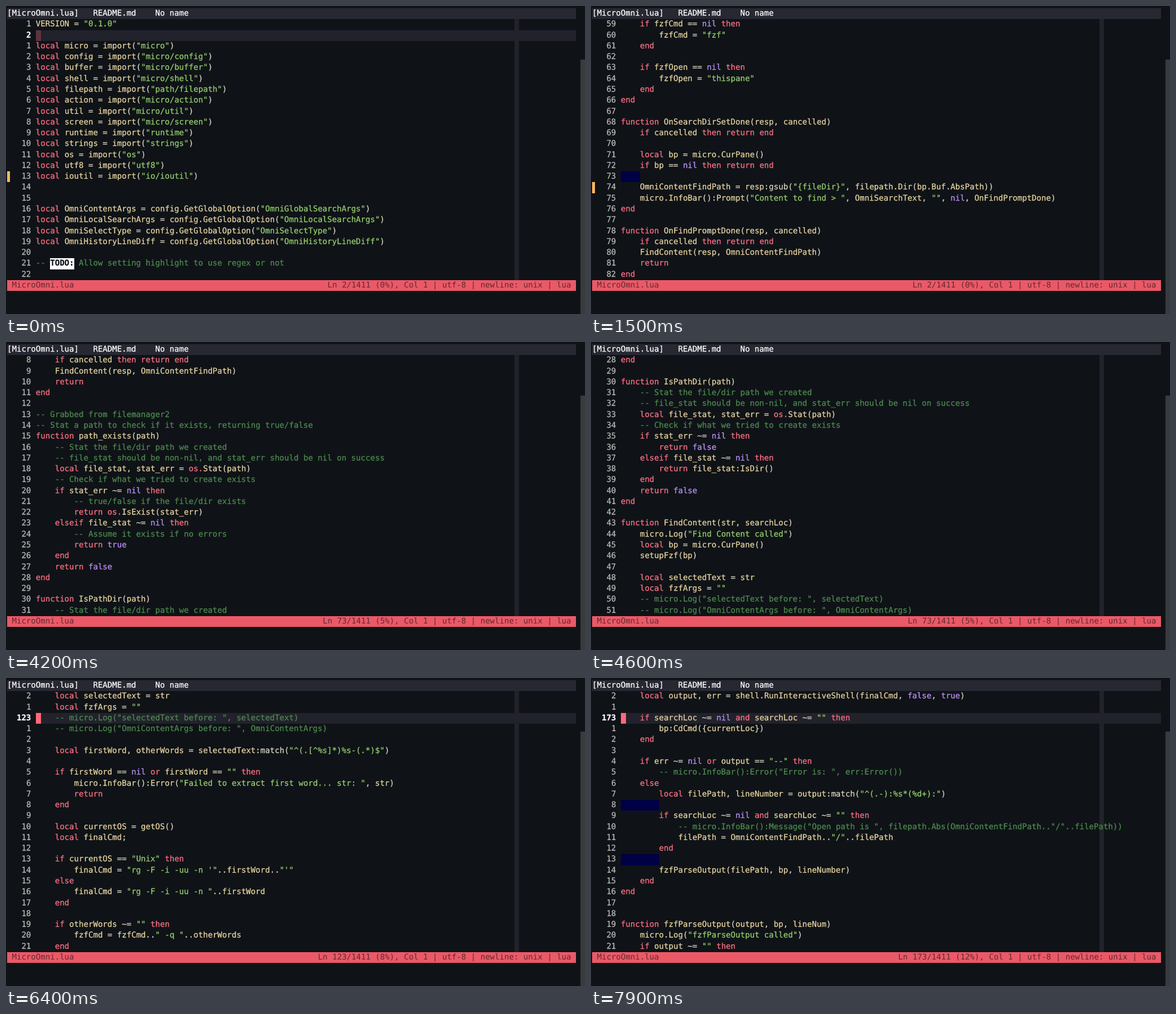
Animation, 1026 px wide and 546 px high, one loop 8 s. Source, as an HTML page:

```html
<!DOCTYPE html>
<html lang="en">
<head>
<meta charset="utf-8">
<title>Editor scrolling</title>
<style>
:root { --cw: 8.4706px; --rh: 19.28px; --line: #22222c; }
html, body { margin: 0; width: 100%; height: 100%; overflow: hidden; background: #0f1317; }
#stage { position: absolute; left: 0; top: 0; width: 1026px; height: 546px; overflow: hidden;
  font: 14.07px/var(--rh) "DejaVu Sans Mono", monospace; text-rendering: geometricPrecision;
  font-variant-ligatures: none; -webkit-text-stroke: 0.25px; color: #dbd5c4; }
#stage div { position: absolute; white-space: pre; }
.row { left: 2px; width: 1008px; height: var(--rh); }
.row .num { left: 0; width: calc(5 * var(--cw)); text-align: right; color: #bababa; }
.row .code { left: calc(6 * var(--cw)); right: 0; height: 100%; }
.row.mark::before { content: ""; position: absolute; left: 0; top: 0; width: 5px; height: 100%; background: #ffb860; }
.row.cur .code { background: var(--line); }
.row.cur .num { color: #fff; font-weight: bold; }
#tabs { top: 4px; background: #282833; color: #fff; }
#status { top: 486px; height: 19px; background: #eb5967; color: #642730; -webkit-text-stroke: 0; }
#status span { position: absolute; top: 0; }
#file { left: var(--cw); }
#info { right: var(--cw); }
#ruler { left: 901px; top: 23px; width: 8px; height: 463px; background: var(--line); }
#caret { left: 53px; width: 9px; height: var(--rh); background: #ff6878; }
#bar { left: 1017.5px; top: 95px; width: 9px; height: 451px; background: #3a3b3d; }
.k { color: #ff7085; }
.s { color: #98cf70; }
.c { color: #4d8b4f; }
.v { color: #bd93f9; }
.i { color: #e8d5a2; }
.todo, .ws { display: inline-block; height: 100%; vertical-align: top; }
.todo { background: #fff; color: #0f1317; font-weight: bold; }
.ws { background: #000044; }
</style>
</head>
<body>
<div id="stage">
  <div id="ruler"></div>
  <div id="tabs" class="row">[MicroOmni.lua]   README.md    No name</div>
  <div id="rows" style="left:0;top:0"></div>
  <div id="caret"></div>
  <div id="status" class="row"><span id="file">MicroOmni.lua</span><span id="info"></span></div>
  <div id="bar"></div>
</div>
<script>
const source = String.raw`VERSION = "0.1.0"

local micro = import("micro")
local config = import("micro/config")
local buffer = import("micro/buffer")
local shell = import("micro/shell")
local filepath = import("path/filepath")
local action = import("micro/action")
local util = import("micro/util")
local screen = import("micro/screen")
local runtime = import("runtime")
local strings = import("strings")
local os = import("os")
local utf8 = import("utf8")
local ioutil = import("io/ioutil")


local OmniContentArgs = config.GetGlobalOption("OmniGlobalSearchArgs")
local OmniLocalSearchArgs = config.GetGlobalOption("OmniLocalSearchArgs")
local OmniSelectType = config.GetGlobalOption("OmniSelectType")
local OmniHistoryLineDiff = config.GetGlobalOption("OmniHistoryLineDiff")

-- TODO: Allow setting highlight to use regex or not

local fzfCmd = nil
local fzfOpen = nil

local OmniContentFindPath = ""
local OmniSearchText = ""
local OmniNewFileType = ""

function getOS()
    if runtime.GOOS == "windows" then
        return "Windows"
    else
        return "Unix"
    end
end

-- Asks which directory to search in first
function OmniContent(bp)
    OmniSearchText = ""

    if bp.Cursor:HasSelection() then
        OmniSearchText = getSelection(bp)
    end

    local bar = micro.InfoBar()
    bar:Prompt("Search dir > ",
        "{fileDir}", OnSearchDirSetDone)
end

-- Read the fzf options of the user
-- and use defaults if they are not set
function setupFzf(bp)
    local get = config.GetGlobalOption

    fzfCmd = get("fzfcmd")
    fzfOpen = get("fzfopen")

    if fzfCmd == nil then
        fzfCmd = "fzf"
    end

    if fzfOpen == nil then
        fzfOpen = "thispane"
    end
end

function OnSearchDirSetDone(resp, cancelled)
    if cancelled then return end

    local bp = micro.CurPane()
    if bp == nil then return end
    
    OmniContentFindPath = resp:gsub("{fileDir}", filepath.Dir(bp.Buf.AbsPath))
    micro.InfoBar():Prompt("Content to find > ", OmniSearchText, "", nil, OnFindPromptDone)
end

function OnFindPromptDone(resp, cancelled)
    if cancelled then return end
    FindContent(resp, OmniContentFindPath)
    return
end

-- Grabbed from filemanager2
-- Stat a path to check if it exists, returning true/false
function path_exists(path)
    -- Stat the file/dir path we created
    -- file_stat should be non-nil, and stat_err should be nil on success
    local file_stat, stat_err = os.Stat(path)
    -- Check if what we tried to create exists
    if stat_err ~= nil then
        -- true/false if the file/dir exists
        return os.IsExist(stat_err)
    elseif file_stat ~= nil then
        -- Assume it exists if no errors
        return true
    end
    return false
end

function IsPathDir(path)
    -- Stat the file/dir path we created
    -- file_stat should be non-nil, and stat_err should be nil on success
    local file_stat, stat_err = os.Stat(path)
    -- Check if what we tried to create exists
    if stat_err ~= nil then
        return false
    elseif file_stat ~= nil then
        return file_stat:IsDir()
    end
    return false
end

function FindContent(str, searchLoc)
    micro.Log("Find Content called")
    local bp = micro.CurPane()
    setupFzf(bp)

    local selectedText = str
    local fzfArgs = ""
    -- micro.Log("selectedText before: ", selectedText)
    -- micro.Log("OmniContentArgs before: ", OmniContentArgs)

    local firstWord, otherWords = selectedText:match("^(.[^%s]*)%s-(.*)$")

    if firstWord == nil or firstWord == "" then
        micro.InfoBar():Error("Failed to extract first word... str: ", str)
        return
    end

    local currentOS = getOS()
    local finalCmd;

    if currentOS == "Unix" then
        finalCmd = "rg -F -i -uu -n '"..firstWord.."'"
    else
        finalCmd = "rg -F -i -uu -n "..firstWord
    end

    if otherWords ~= "" then
        fzfCmd = fzfCmd.." -q "..otherWords
    end

    finalCmd = finalCmd.." | "..fzfCmd
    if currentOS == "Unix" then
        -- rg -F -i -uu -n "{keyword}" | fzf --delimiter : --preview "bat -n --color=always -H {2} {1}" -q text
        finalCmd = "sh -c '"..finalCmd.."'"
    else
        finalCmd = "cmd /s /v /c "..finalCmd..""
    end

    micro.Log("Running search cmd: ", finalCmd)

    local currentLoc = os.Getwd()
    if searchLoc ~= nil and searchLoc ~= "" then
        if not path_exists(searchLoc) then
            micro.InfoBar():Error("", searchLoc, " doesn't exist")
            return
        end

        if not IsPathDir(searchLoc) then
            micro.InfoBar():Error("", searchLoc, " is not a directory")
            return
        end

        bp:CdCmd({searchLoc})
    end

    local output, err = shell.RunInteractiveShell(finalCmd, false, true)

    if searchLoc ~= nil and searchLoc ~= "" then
        bp:CdCmd({currentLoc})
    end

    if err ~= nil or output == "--" then
        -- micro.InfoBar():Error("Error is: ", err:Error())
    else
        local filePath, lineNumber = output:match("^(.-):%s*(%d+):")
        
        if searchLoc ~= nil and searchLoc ~= "" then
            -- micro.InfoBar():Message("Open path is ", filepath.Abs(OmniContentFindPath.."/"..filePath))
            filePath = OmniContentFindPath.."/"..filePath
        end
        
        fzfParseOutput(filePath, bp, lineNumber)
    end
end


function fzfParseOutput(output, bp, lineNum)
    micro.Log("fzfParseOutput called")
    if output ~= "" then`;

const LOOP = 8000, TICK = 100, ROWS = 24, ROW_H = 19.28, TOTAL = 1411, FADE = 800;
const MARKS = [15, 50, 76];

// [time, value] pairs
const tops = [[0, 1], [300, 11], [600, 21], [700, 31], [900, 41], [1200, 51], [1500, 61],
  [4000, 71], [4200, 81], [4400, 91], [4600, 101], [5100, 111],
  [6400, 121], [6500, 131], [6600, 141], [6800, 151], [7100, 161], [7900, 171]];
const carets = [[0, 2], [3300, 73], [5800, 123], [7500, 173]];
// the caret turns fully bright whenever it moves on screen
const blinks = [-590, 3300, 4000, 5800, 6400, 7500, 7900].map(t => [t, t]);

const at = (track, t) => track.filter(k => k[0] <= t).pop()[1];
const rowTop = r => 4 + (r + 1) * ROW_H + "px";
const $ = id => document.getElementById(id);

const TOKEN = new RegExp([
  /(?<c>--.*$)/, /(?<s>"[^"]*")/, /(?<ws>\s+$)/,
  /(?<k>\b(?:local|if|then|end|function|return|else|elseif|not|and|or)\b|\bos\.)/,
  /(?<v>\b(?:nil|true|false)\b)/, /(?<d>\b(?:gsub|match)\b)/, /(?<i>[A-Za-z_]\w*)/, /(?<o>[<>&])/
].map(r => r.source).join("|"), "g");

const escape = s => s.replace(/&/g, "&amp;").replace(/</g, "&lt;").replace(/>/g, "&gt;");

function paint(line) {
  return line.replace(TOKEN, (text, ...rest) => {
    const groups = rest.pop();
    const kind = Object.keys(groups).find(k => groups[k] !== undefined);
    const body = escape(text).replace(/^(-- )(TODO:)/, '$1<span class="todo">$2</span>');
    return `<span class="${kind}">${body}</span>`;
  });
}

const lines = source.split("\n").map(paint);

const rows = Array.from({ length: ROWS }, (_, r) => {
  const el = document.createElement("div");
  el.innerHTML = '<div class="num"></div><div class="code"></div>';
  el.style.top = rowTop(r);
  $("rows").append(el);
  return el;
});

function render(top, caret) {
  rows.forEach((el, r) => {
    const n = top + r, [num, code] = el.children;
    el.className = "row" + (n === caret ? " cur" : "") + (MARKS.includes(n) ? " mark" : "");
    num.textContent = n === caret ? n : Math.abs(n - caret);
    code.innerHTML = lines[n - 1];
  });
  const percent = Math.floor(caret * 100 / TOTAL);
  $("info").textContent = `Ln ${caret}/${TOTAL} (${percent}%), Col 1 | utf-8 | newline: unix | lua`;
  const row = caret - top;
  $("caret").style.display = row >= 0 && row < ROWS ? "block" : "none";
  $("caret").style.top = rowTop(row);
}

let last = "";
const start = performance.now();
function frame() {
  const now = Math.max(0, performance.now() - start) % LOOP;
  const t = Math.floor(now / TICK) * TICK;
  const top = at(tops, t), caret = at(carets, t);
  const key = top + "/" + caret;
  if (key !== last) render(top, caret);
  last = key;
  const phase = (t - at(blinks, t)) / FADE % 2;
  $("caret").style.opacity = Math.abs(1 - phase);
  requestAnimationFrame(frame);
}
frame();
</script>
</body>
</html>
```
